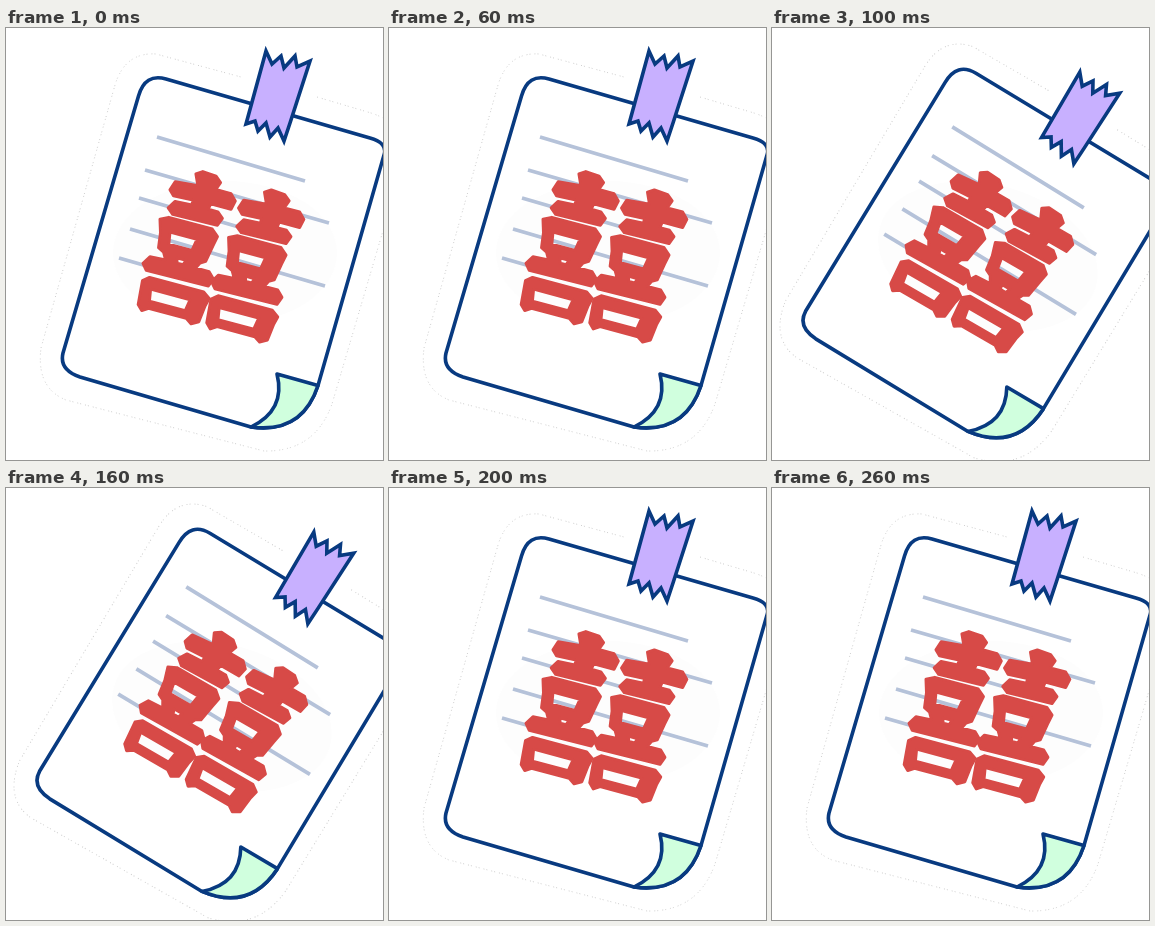
Recreate the animation shown at these times as an HTML page. Size 377 by 432 pixels, loop 300 ms.

```html
<!DOCTYPE html>
<html lang="en">
<head>
<meta charset="utf-8">
<title>Swinging note</title>
<style>
  html, body { margin: 0; width: 100%; height: 100%; overflow: hidden; background: #fff; }
  svg { display: block; width: 100%; height: 100%; }
  .ink { stroke: #083a80; stroke-width: 3.6; stroke-linejoin: round; }
  .tape { fill: #c8b0ff; stroke-linejoin: miter; }
  .rules { stroke: #b5c2d9; stroke-width: 3.8; }
  .seal { fill: #d74a47; fill-rule: evenodd; stroke: #d74a47; stroke-width: 3; stroke-linejoin: round; }
</style>
</head>
<body>
<svg viewBox="0 0 377 432" role="img" aria-label="Note with 囍">
  <defs>
    <g id="joy">
      <path d="M-10 -75 L-4 -79 L10 -78 L16 -73 L13 -65 L29 -65 L35 -59 L33 -50 L12 -50 L11 -44
               L21 -44 L27 -39 L24 -31 L-22 -30 L-28 -35 L-23 -43 L-6 -44 L-6 -49 L-26 -48
               L-31 -53 L-28 -62 L-5 -64 Z"/>
      <path d="M-33 -22 L-25 -26 L20 -26 L27 -20 L25 -10 L22 7 L17 10 L14 16 L28 16 L34 22 L31 30
               L-33 31 L-38 25 L-33 17 L-17 16 L-21 9 L-27 6 L-29 -9 Z
               M-20 -12 L-18 0 L6 0 L8 -12 Z M-7 11 L-5 16 L1 16 L3 11 Z"/>
      <path d="M-34 42 L-28 37 L28 37 L35 42 L33 50 L31 67 L24 71 L18 67 L-21 67 L-27 71 L-32 66 Z
               M-24 48 L-22 60 L15 60 L17 48 Z"/>
    </g>
  </defs>
  <g id="note">
    <path fill="none" stroke="#cfcfcf" stroke-dasharray="1 4 1 2"
      d="M35 320 L109 57 Q119 24 150 26 L235 49 M311 69 L365 85 Q402 97 399 128
         L326 376 Q309 424 258 423 L60 372 Q30 360 35 320"/>
    <path class="ink" fill="#fff"
      d="M57 325 L132.500 68 Q139 45 160 51 L364 110 Q382 115 378 127
         L312 357.500 Q296 406 245 399 L74 349 Q53 342 57 325 Z"/>
    <ellipse cx="219" cy="225" rx="112" ry="72" fill="#fdfdfd"/>
    <path class="rules"
      d="M151 109 L299 153 M139 142 L323 195 M133 170 L250 204 M124 201 L319 258 M113 230 L200 255"/>
    <path class="ink" fill="#d0ffde" d="M271 346 L312 357.500 Q296 406 245 399 Q280 382 271 346 Z"/>
    <path class="ink tape"
      d="M260 23 L266 36 L275 28 L278 40 L289 28 L291 39 L304 33 L284 95 L278 113 L272 100
         L264 109 L260 95 L252 103 L249 93 L240 96 Z"/>
    <g class="seal" transform="translate(214 230) rotate(15)">
      <use href="#joy" x="-35"/>
      <use href="#joy" x="36"/>
    </g>
  </g>
</svg>
<script>
  const LOOP = 300, SWING_START = 100, SWING_END = 200;
  const note = document.getElementById('note');

  function draw(time) {
    const t = time % LOOP;
    const swung = t >= SWING_START && t < SWING_END;
    note.setAttribute('transform', swung ? 'translate(62.6 -45.4) rotate(15)' : '');
  }

  const start = performance.now();
  function tick(now) {
    draw(Math.max(0, now - start));
    requestAnimationFrame(tick);
  }
  draw(0);
  requestAnimationFrame(tick);
</script>
</body>
</html>
```
